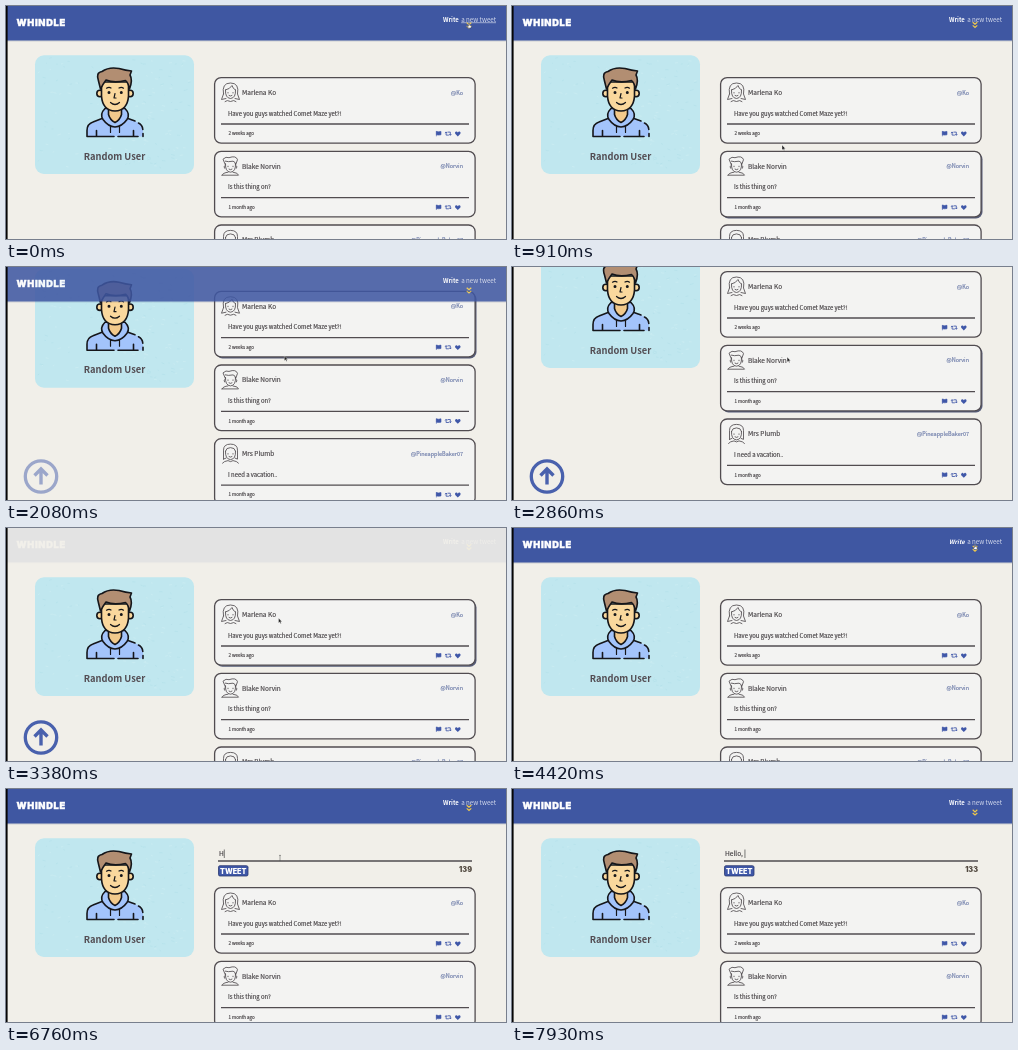
These frames come from a looping animation (500x233 px, 8000 ms). An HTML page:

```html
<!DOCTYPE html>
<html lang="en">
<head>
<meta charset="utf-8">
<title>Microblog demo</title>
<style>
html, body { margin: 0; width: 100%; height: 100%; overflow: hidden; background: #f1efe9; }
svg { display: block; width: 500px; height: 233px; }
text { font-family: "Noto Sans CJK JP", "Noto Sans CJK SC", "Open Sans", sans-serif; fill: #474346; white-space: pre; }
.heavy { font-family: Inter, "Open Sans", sans-serif; font-weight: 900; }
.mid { font-weight: 500; stroke: #474346; stroke-width: .16; }
.handle { font-weight: 500; fill: #7482ad; stroke: #7482ad; stroke-width: .2; }
.line { fill: none; stroke: #514c50; stroke-width: .85; stroke-linecap: round; stroke-linejoin: round; }
.ink { stroke: #15161a; stroke-width: 1.6; stroke-linecap: round; stroke-linejoin: round; }
</style>
</head>
<body>
<svg viewBox="0 0 500 233">
  <defs>
    <clipPath id="reveal"><rect id="window" x="205" y="56" width="270" height="0"/></clipPath>
    <g id="icons" fill="#3f57a8">
      <path d="M-2.200 -2.500V2.700M-2.200 -2.200L0 -1.800L2.400 -2.200V1.200L0 1.500L-2.200 1.200Z" stroke="#3f57a8" stroke-width=".6"/>
      <path d="M7.500 -1.600V1.500H10.300M11.700 1.600V-1.500H8.900M6.500 -.5L7.500 -1.700L8.500 -.5M10.700 .5L11.700 1.700L12.700 .5" fill="none" stroke="#3f57a8" stroke-width=".85"/>
      <path d="M19.200 2.800L16.600 .2Q15.900 -1.500 17.400 -2.100Q18.600 -2.300 19.200 -1Q19.800 -2.300 21 -2.100Q22.500 -1.500 21.800 .2Z"/>
    </g>
  </defs>
  <rect width="500" height="233" fill="#f1efe9"/>
  <g id="page">
    <rect x="29" y="49.3" width="159" height="118.700" rx="9" fill="#c0e7ef"/>
    <g id="grain" stroke-width=".8" stroke-linecap="round" opacity=".55"></g>
    <g class="ink">
      <path d="M81 130.500V124.500Q81 118 87 116L97 112H121L131 116Q137 118 137 124.500V130.500Z" fill="#a3c4fb" stroke="none"/>
      <path d="M81 130.500V124.500Q81 118 87 116L96 112.500M122 112.500L129 115M132.500 117Q136.500 119 136.800 123.500M137 127.500V130.500M81 130.500H108M112 130.500H132M90.500 124.500V130M127.500 124.500V130" fill="none"/>
      <path d="M99 102.500Q93.500 108 97 113.500Q102 120.500 109 121Q116 120.500 121 113.500Q124.500 108 119 102.500Z" fill="#a3c4fb"/>
      <path d="M102.500 101V108.500Q104 114 109 116.500Q114 114 115.500 108.500V101Z" fill="#f2c98b"/>
      <path d="M104.500 120.500V126.500M113.500 120.500V126.500" fill="none" stroke-width="1.200"/>
      <circle cx="94" cy="87.500" r="3.200" fill="#fad89d"/>
      <circle cx="124" cy="87.500" r="3.200" fill="#fad89d"/>
      <path d="M95.500 76V90Q96.500 104.500 109 105Q121.500 104.500 122.500 90V76Z" fill="#fad89d"/>
      <path d="M94.500 83L92.500 75Q89.500 66.500 96 65.500Q103 60.500 113 62.500Q120 64.500 125.500 65L124 69Q127 74 123.500 83Q122.500 77 119.500 74.500Q108 77.500 100 74Q97 78 94.500 83Z" fill="#b28e72"/>
      <path d="M100.500 82.200Q103 80.500 105 82M113 82Q115.500 80.500 117.500 82.200M109 87.500L108 92H110M104.500 96.500Q109 100.500 113.500 96.500" fill="none" stroke-width="1.200"/>
      <circle cx="103" cy="86.500" r=".7" fill="#15161a"/>
      <circle cx="115.300" cy="86.500" r=".7" fill="#15161a"/>
    </g>
    <text x="108.500" y="153.500" font-size="9.300" font-weight="700" text-anchor="middle" style="fill:#524c52">Random User</text>
    <g clip-path="url(#reveal)">
      <text id="draft" class="mid" x="213" y="67.300" font-size="6.600"></text>
      <path id="caret" d="M0 60.500V69" stroke="#444" stroke-width=".7"/>
      <path d="M212 72H466" stroke="#514c50" stroke-width="1.300"/>
      <rect x="212.500" y="76.700" width="29.500" height="10.300" rx="1.500" fill="#3f57a8" stroke="#29386f" stroke-width=".8"/>
      <text class="heavy" x="227.200" y="84.500" font-size="7.200" text-anchor="middle" style="fill:#fff">TWEET</text>
      <text id="count" class="heavy" x="466" y="83.300" font-size="7.200" text-anchor="end" style="fill:#51483f"></text>
    </g>
    <g id="cards"></g>
  </g>
  <g id="header">
    <rect y="34" width="500" height="1.600" fill="#34416f" opacity=".15"/>
    <rect width="500" height="34.500" fill="#3f57a2"/>
    <text class="heavy" x="10.500" y="19.900" font-size="9.300" letter-spacing=".7" stroke="#fff" stroke-width=".4" style="fill:#fff">WHINDLE</text>
    <text id="write" x="437" y="15.500" font-size="6" font-weight="700" style="fill:#fff">Write</text>
    <text id="link" x="490" y="15.500" font-size="6.200" text-anchor="end" style="fill:#d5dbee">a new tweet</text>
    <path id="chevrons" d="M-2.300 -2.800L0 -.7L2.300 -2.800M-2.300 .4L0 2.500L2.300 .4" fill="none" stroke="#efc84c" stroke-width="1.200"/>
  </g>
  <g id="toTop" fill="none" stroke="#4961ad" stroke-width="3.300">
    <circle cx="35" cy="209.500" r="15.700"/>
    <path d="M35 217.500V203M28.500 208.500L35 202L41.500 208.500" stroke-width="3.400"/>
  </g>
  <g id="pointer">
    <path id="arrow" d="M0 0V5L1.200 4L2 5.700L2.800 5.300L2 3.700H3.500Z" fill="#222" stroke="#fff" stroke-width=".35"/>
    <path id="hand" d="M-.5 0Q0 -.6 .5 0V2.200L2.300 2.700L2 5H-.6L-2 3L-.5 3.200Z" fill="#fff" stroke="#333" stroke-width=".4"/>
    <path id="beam" d="M-1 -2.600H1M0 -2.600V2.600M-1 2.600H1" fill="none" stroke="#666" stroke-width=".6"/>
  </g>
  <rect width="1.600" height="233" fill="#050505"/>
</svg>
<script>
const LOOP = 8000, TOP = 71.6, PITCH = 73.7, CARD_H = 65.6, FORM_H = 27;
const $ = id => document.getElementById(id);
const clamp = v => Math.max(0, Math.min(1, v));
const swing = (t, from, to) => .5 - Math.cos(Math.PI * clamp((t - from) / (to - from))) / 2;
const place = (el, x, y) => el.setAttribute('transform', `translate(${x.toFixed(2)} ${y.toFixed(2)})`);
const show = (el, on) => el.setAttribute('visibility', on ? 'visible' : 'hidden');

const face = 'M219.500 84Q219 92 224.500 92.500Q230 92 229.500 84M222 86.500V87M227 86.500V87M223 89.500Q224.500 90.700 226 89.500';
const hair = [
  'M217.500 88Q215.500 77 224.500 77Q233.500 77 231.500 88L233.500 93.500L229 92.500M217.500 88L215.500 93.500L220 92.500M219.500 84Q224 83 226 79.500Q227 83 229.500 84M219 95.500Q221 93.500 224.500 95.500Q228 93.500 230 95.500',
  'M219.300 85L217 79.500Q220 76.500 223 78Q230 75.500 231.500 80L229.700 85Q229 81.500 227 81.500Q222 82.500 219.300 81.500M216 95.500Q217 93 222 92.500M227 92.500Q232 93 232.500 95.500H216M218.800 86Q217.200 86 218.500 88.500M230.200 86Q231.800 86 230.500 88.500',
  'M217.500 92V83Q217.500 77 224.500 77Q231.500 77 231.500 83V92L229 91M217.500 92L220 91M219.500 84Q220 80.500 224.500 80.500Q229 80.500 229.500 84M216.500 96Q218 94 222 93.500Q224.500 95.500 227 93.500Q231 94 232.500 96'
];
const posts = [
  ['Marlena Ko', '@Ko', 'Have you guys watched Comet Maze yet?!', '2 weeks ago'],
  ['Blake Norvin', '@Norvin', 'Is this thing on?', '1 month ago'],
  ['Mrs Plumb', '@PineappleBaker07', 'I need a vacation..', '1 month ago']
];
$('cards').innerHTML = posts.map(([name, handle, body, age], i) => `
  <g transform="translate(0 ${i * PITCH})">
    <rect class="shade" x="210" y="${TOP + 1.5}" width="260.500" height="${CARD_H}" rx="6.500" fill="#565d7a"/>
    <rect x="208.600" y="${TOP}" width="260.500" height="${CARD_H}" rx="6.500" fill="#f3f3f2" stroke="#514c50" stroke-width="1.300"/>
    <path class="line" d="${face}${hair[i]}"/>
    <text class="mid" x="236" y="89" font-size="6.500">${name}</text>
    <text class="handle" x="457" y="88.500" font-size="5.500" text-anchor="end">${handle}</text>
    <text class="mid" x="222" y="109.700" font-size="5.900">${body}</text>
    <path d="M215 118H463" stroke="#514c50" stroke-width="1.300"/>
    <text class="mid" x="222.500" y="129.300" font-size="4.500">${age}</text>
    <use href="#icons" x="432.600" y="127.600"/>
  </g>`).join('');
const shades = [...document.querySelectorAll('.shade')];

// Faint paper grain on the profile panel
let seed = 7;
const rnd = () => (seed = seed * 16807 % 2147483647) / 2147483647;
let grain = '';
for (let i = 0; i < 160; i++) {
  const x = 32 + rnd() * 151, y = 52 + rnd() * 112;
  grain += `<path d="M${x} ${y}l${rnd() * 3} ${rnd() * 2 - 1}" stroke="${i % 2 ? '#d3f0f4' : '#aedde8'}"/>`;
}
$('grain').innerHTML = grain;

// Pointer route: time, x, y
const route = [
  [0, 463, 17], [200, 463, 17], [580, 330, 165], [760, 286, 164], [910, 270, 139],
  [1300, 296, 106], [1850, 279, 88.5], [2600, 276, 90], [3380, 272.5, 90], [3600, 285, 88],
  [4250, 463, 16.5], [5350, 463, 16.5], [6200, 274, 69], [8000, 274, 69]
];
function pointerAt(t) {
  const n = Math.max(1, route.findIndex(p => p[0] >= t));
  const [a, b] = [route[n - 1], route[n]];
  const k = swing(t, a[0], b[0]);
  return [a[1] + (b[1] - a[1]) * k, a[2] + (b[2] - a[2]) * k];
}
const scrollAt = t => 67 * (swing(t, 1900, 2185) - swing(t, 2860, 3250));
const formAt = t => FORM_H * swing(t, 5000, 5400);

const message = 'Hello, ';
const keys = [6700, 6960, 7110, 7260, 7420, 7660, 7850];

function hoveredCard(t) {
  const [x, y] = pointerAt(t);
  if (x < 208 || x > 470 || y < 35) return -1;
  const rel = y + scrollAt(t) - formAt(t) - TOP;
  const i = Math.floor(rel / PITCH);
  return rel - i * PITCH < CARD_H ? i : -1;
}

function draw(t) {
  const form = formAt(t), [x, y] = pointerAt(t);
  place($('page'), 0, -scrollAt(t));
  place($('cards'), 0, form);
  $('window').setAttribute('height', form * 1.2);

  const hover = hoveredCard(Math.max(0, t - 120));
  shades.forEach((s, i) => show(s, i === hover));

  $('header').setAttribute('opacity', 1 - swing(t, 2000, 2340) + swing(t, 3325, 3650));
  $('toTop').setAttribute('opacity', swing(t, 1930, 2230) - swing(t, 3380, 3700));
  place($('chevrons'), 463, 21.5 - 2.5 * Math.cos(2 * Math.PI * (t - 6760) / 835));

  const onLink = x > 436 && y < 22;
  $('link').setAttribute('text-decoration', onLink && t < 300 ? 'underline' : 'none');
  $('write').setAttribute('font-style', onLink && t > 4200 && t < 4700 ? 'italic' : 'normal');

  const typed = keys.filter(k => k <= t).length;
  $('draft').textContent = message.slice(0, typed);
  $('count').textContent = 140 - typed;
  const width = typed ? $('draft').getComputedTextLength() : 0;
  place($('caret'), 213.5 + width, 0);
  show($('caret'), form > FORM_H - 1);

  place($('pointer'), x, y);
  show($('pointer'), t < 6900);
  const onInput = t > 6050;
  $('hand').style.display = onLink ? '' : 'none';
  $('beam').style.display = onInput ? '' : 'none';
  $('arrow').style.display = onLink || onInput ? 'none' : '';
}

const start = performance.now();
function tick() {
  draw((performance.now() - start) % LOOP);
  requestAnimationFrame(tick);
}
tick();
</script>
</body>
</html>
```
